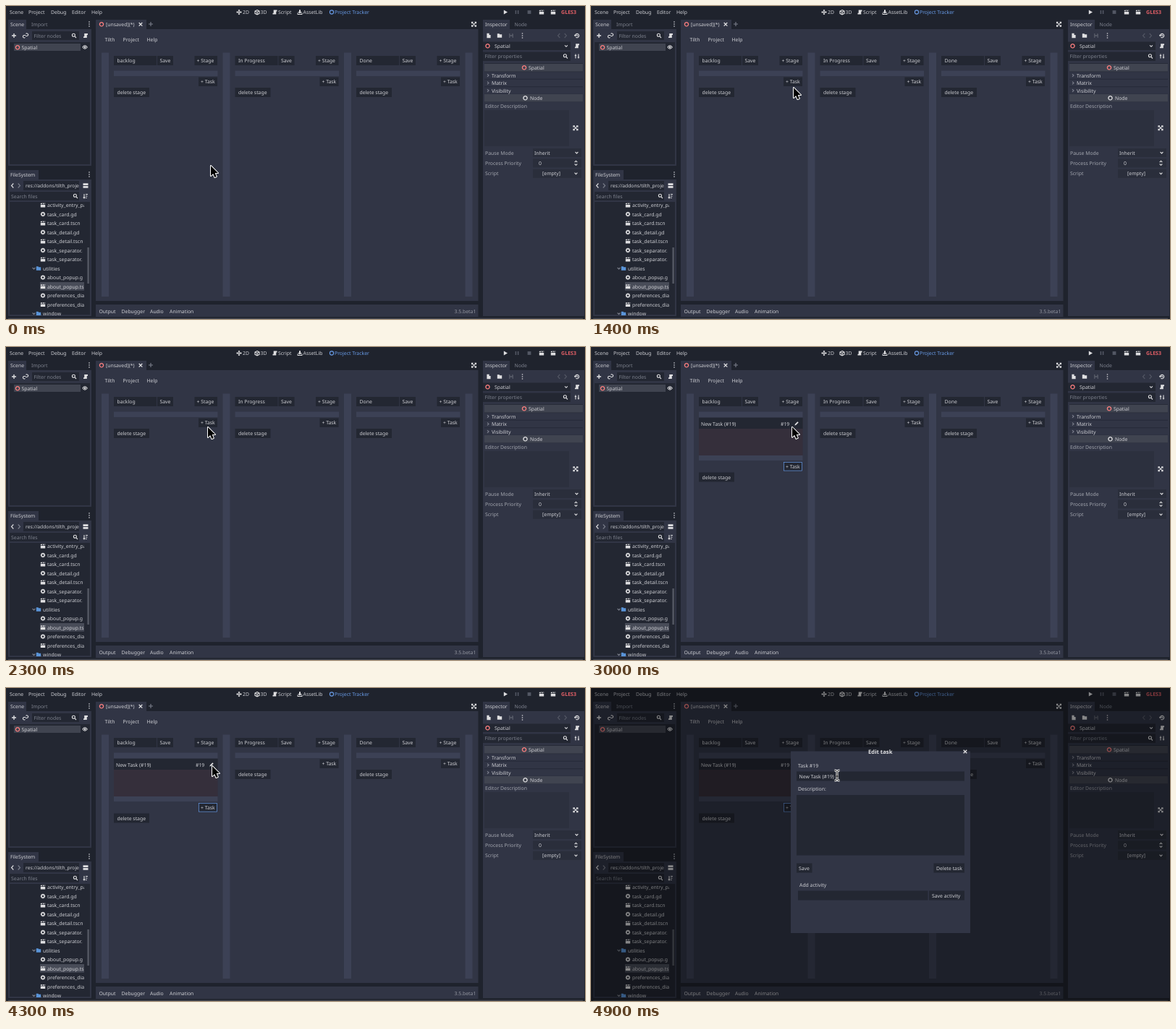
An HTML page with a canvas that plays this animation: 800x433 px, repeating every 5 s.

```html
<!DOCTYPE html>
<html lang="en">
<head>
<meta charset="utf-8">
<title>Project board</title>
<style>
  html, body { margin: 0; width: 100%; height: 100%; overflow: hidden; background: #1f232d; }
  canvas { display: block; width: 800px; height: 433px; }
</style>
</head>
<body>
<canvas width="800" height="433"></canvas>
<script>
const ctx = document.querySelector('canvas').getContext('2d');
const BASE = '#1f232d', PANEL = '#313545', DARK = '#232732', WELL = '#272b38',
      BAR = '#3c4155', ROW = '#404450', INK = '#cdced3', WHITE = '#e0e0e2',
      DIM = '#7d818d', FAINT = '#535764', RED = '#fc7f7f', BLUE = '#699ce8';
const LOOP = 5000, STEP = 100, CARD_AT = 2500, DIALOG_AT = 4400, PITCH = 167.5;

// Small icon outlines, centred on 0,0
const ICONS = {
  plus: 'M-3 0H3M0-3V3',
  cross: 'M-2.3-2.3L2.3 2.3M2.3-2.3L-2.3 2.3',
  down: 'M-1.9-1L0 1L1.9-1',
  right: 'M-1-1.9L1 0L-1 1.9',
  back: 'M1.3-3L-1.5 0L1.3 3',
  next: 'M-1.3-3L1.5 0L-1.3 3',
  search: 'M1.4-.8A2 2 0 1 1-2.6-.8A2 2 0 1 1 1.4-.8M.9.8L3 3',
  link: 'M-.5 2.5A1.8 1.8 0 1 1-2-.5H0M.5-2.5A1.8 1.8 0 1 1 2 .5H0',
  expand: 'M-3-1V-3H-1M1-3H3V-1M3 1V3H1M-1 3H-3V1M-3-3L3 3M3-3L-3 3',
  eye: 'M-3.2 0Q0-4.4 3.2 0Q0 4.4-3.2 0M.7 0A.7.7 0 1 1-.7 0A.7.7 0 1 1 .7 0',
  ring: 'M2.6 0A2.6 2.6 0 1 1-2.6 0A2.6 2.6 0 1 1 2.6 0',
  gear: 'M2 0A2 2 0 1 1-2 0A2 2 0 1 1 2 0M-3.2 0H-2M2 0H3.2M0-3.2V-2M0 2V3.2M-2.3-2.3L-1.5-1.5M1.5 1.5L2.3 2.3M2.3-2.3L1.5-1.5M-1.5 1.5L-2.3 2.3',
  sort: 'M-2-3V3M-3.3 1.7L-2 3L-.7 1.7M0-2.5H3M0 0H2.4M0 2.5H1.6',
  tools: 'M-2-3V3M-3.2-1H-.8M2-3V3M.8 1.5H3.2',
  history: 'M-2.6-.5A2.7 2.7 0 1 1-1.5 2.3M-3.6-1L-2.6.6L-1.2-1M0-1.4V.3H1.5',
  spin: 'M-1.8-1.2L0-3L1.8-1.2M-1.8 1.2L0 3L1.8 1.2',
  move: 'M-3 0H3M0-3V3M-2-1L-3 0L-2 1M2-1L3 0L2 1M-1-2L0-3L1-2M-1 2L0 3L1 2',
  cube: 'M0-3L3-1.5V1.8L0 3.3L-3 1.8V-1.5ZM-3-1.5L0 0L3-1.5M0 0V3.3',
  play: 'M-2.2-3L3 0L-2.2 3Z',
  pause: 'M-2.4-2.6H-.8V2.6H-2.4ZM.8-2.6H2.4V2.6H.8Z',
  stop: 'M-2.4-2.4H2.4V2.4H-2.4Z',
  clap: 'M-3.2-.4H3.2V3H-3.2ZM-3.2-2.6L-1.4-3L-.6-1.2H-3.2ZM-.4-3H1.2L2-1.2H.4ZM2.2-3H3.2V-1.2H3Z',
  folder: 'M-3.2-2.7H-.5L.3-1.7H3.2V2.7H-3.2Z',
  script: 'M-1.8-3H3V-1H1.8V3H-3V1.3H-1.8Z',
  file: 'M-2.6-3.2H.6V-1H2.6V3.2H-2.6Z',
  save: 'M-3-3H2L3-2V3H-3ZM-1.5-3V-1H1.2V-3ZM-1.5 3V1H1.5V3Z',
  asset: 'M-1-3.2H1V-.5H3L0 2L-3-.5H-1ZM-3.4 1H-2.4V2.5H2.4V1H3.4V3.4H-3.4Z',
  split: 'M-3.5-3.2H3.5V-.4H-3.5ZM-3.5.4H3.5V3.2H-3.5Z',
  pencil: 'M-2.6 2.6L-2.1.8L1.4-2.7L2.7-1.4L-.8 2.1Z',
};
const SOLID = new Set('play pause stop clap folder script file save asset split pencil'.split(' '));
for (const name in ICONS) ICONS[name] = new Path2D(ICONS[name]);

function rect(x, y, right, bottom, color) {
  ctx.fillStyle = color;
  ctx.fillRect(x, y, right - x, bottom - y);
}

function text(s, x, y, color = INK, font = '6.87px') {
  ctx.font = font + ' "Noto Sans", sans-serif';
  ctx.fillStyle = color;
  ctx.fillText(s, x, y + 2.5);
}

function icon(name, x, y, color = WHITE, width = 1.1) {
  ctx.save();
  ctx.translate(x, y);
  ctx.fillStyle = ctx.strokeStyle = color;
  ctx.lineWidth = width;
  if (SOLID.has(name)) ctx.fill(ICONS[name], 'evenodd');
  else ctx.stroke(ICONS[name]);
  ctx.restore();
}

function dots(x, y) {
  for (const dy of [-3, 0, 3]) rect(x - .7, y + dy - .7, x + .7, y + dy + .7, INK);
}

// Box with a label; the optional ring marks keyboard focus
function button(s, x, y, right, bottom, pad = 4.5, ring) {
  rect(x, y, right, bottom, DARK);
  text(s, x + pad, (y + bottom) / 2);
  if (ring) {
    ctx.strokeStyle = BLUE;
    ctx.lineWidth = .7;
    ctx.strokeRect(x + .4, y + .4, right - x - .8, bottom - y - .8);
  }
}

function dock(title, x, tabRight, y, right, bottom) {
  rect(x, y, tabRight, y + 13.5, PANEL);
  rect(x, y + 13, right, bottom, PANEL);
  text(title, x + 3, y + 6.3);
}

function drawTopBar() {
  [['Scene', 5], ['Project', 31], ['Debug', 62], ['Editor', 91], ['Help', 118]]
    .forEach(([s, x]) => text(s, x, 8.5));
  [['move', 322, '2D', 327], ['cube', 347, '3D', 351.5], ['script', 371.5, 'Script', 376], ['asset', 406, 'AssetLib', 410.5]]
    .forEach(([name, x, s, tx]) => { icon(name, x, 8.5); text(s, tx, 8.5); });
  icon('ring', 450, 8.5, BLUE);
  text('Project Tracker', 454, 8.5, BLUE);
  icon('play', 690, 8.5);
  icon('pause', 706, 8.5, FAINT);
  icon('stop', 723, 8.5, FAINT);
  icon('clap', 740, 8.5);
  icon('clap', 756, 8.5);
  text('GLES3', 767, 8.5, '#e05f66', 'bold 7.1px');
}

function drawSceneDock() {
  dock('Scene', 3, 28, 19, 118, 221);
  text('Import', 35, 25.3, DIM);
  dots(115, 25);
  icon('plus', 11, 41, WHITE, 1.4);
  icon('link', 27, 41);
  rect(36, 35, 101, 47, DARK);
  text('Filter nodes', 38.5, 41, DIM);
  icon('search', 94, 41);
  icon('script', 110, 41);
  rect(5, 50, 116, 219, DARK);
  rect(11, 52, 103, 62, ROW);
  icon('ring', 16, 57.3, RED, 1.3);
  text('Spatial', 21.5, 57.3);
  icon('eye', 109, 57);
}

function drawFileDock() {
  dock('FileSystem', 3, 45, 227, 118, 429);
  dots(115, 233);
  icon('back', 9, 248.5);
  icon('next', 18, 248.5, DIM);
  rect(24, 242, 101, 255, DARK);
  text('res://addons/tilth_proje', 27, 248.5, INK, '6.7px');
  icon('split', 110, 248.5);
  rect(5, 257, 101, 269, DARK);
  text('Search files', 7, 263.3, DIM);
  icon('search', 96, 263);
  icon('sort', 110, 263);
  rect(5, 271, 116, 427, DARK);
  ctx.save();
  ctx.beginPath();
  ctx.rect(5, 271, 103, 157);
  ctx.clip();
  rect(47, 382, 108, 393.5, '#484c58');
  const files = ['activity_entry_panel', 'task_card.gd', 'task_card.tscn', 'task_detail.gd', 'task_detail.tscn',
    'task_separator.', 'task_separator.', '/utilities', 'about_popup.g', 'about_popup.ts',
    'preferences_dia', 'preferences_dia', '/window'];
  files.forEach((name, i) => {
    const y = 275.5 + i * 12.5;
    if (name[0] === '/') {
      icon('down', 38.5, y, DIM);
      icon('folder', 45, y, '#5a94d8');
      text(name.slice(1), 51, y);
    } else {
      const scene = i < 7 ? i % 2 === 0 : i % 2 === 1;
      icon(scene ? 'clap' : 'gear', 51, y, WHITE, 1.4);
      text(name, 57, y);
    }
  });
  ctx.restore();
  rect(112.3, 334, 115, 384, '#50545f');
}

function drawStage(name, i, hasCard) {
  const x = i * PITCH, drop = hasCard ? 60.5 : 0;
  button(name, x + 149, 69, x + 208, 82);
  button('Save', x + 209, 69, x + 231, 82, 3.5);
  button('+ Stage', x + 260.5, 69, x + 292, 82, 3);
  rect(x + 149, 89.5, x + 292.5, 97, BAR);
  if (hasCard) {
    rect(x + 149, 98, x + 292.5, 150, '#352f3b');
    rect(x + 149, 98, x + 292.5, 113, DARK);
    text('New Task (#19)', x + 152, 106);
    text('#19', x + 262, 106);
    icon('pencil', x + 284, 106);
    rect(x + 149, 150, x + 292.5, 157, BAR);
  }
  button('+ Task', x + 266, 98.5 + drop, x + 292, 111 + drop, 3, hasCard);
  button('delete stage', x + 149, 113 + drop, x + 198, 126 + drop);
}

function drawBoard(hasCard) {
  rect(124, 19, 194, 33, PANEL);
  rect(124, 32, 652.5, 408, PANEL);
  icon('ring', 132, 25.3, RED, 1.3);
  text('[unsaved](*)', 138, 25.3);
  icon('cross', 186, 25.3, WHITE, 1.3);
  icon('plus', 200, 25, DIM);
  icon('expand', 646.5, 25.3);
  text('Tilth', 136.5, 46.5);
  text('Project', 161.5, 46.5);
  text('Help', 194.5, 46.5);
  for (let i = 0; i < 4; i++) rect(132 + i * PITCH, 64.5, 142 + i * PITCH, 402, BAR);
  ['backlog', 'In Progress', 'Done'].forEach((name, i) => drawStage(name, i, hasCard && i === 0));
  rect(124, 413, 652.5, 430, PANEL);
  [['Output', 128.5], ['Debugger', 159.5], ['Audio', 199], ['Animation', 226]]
    .forEach(([s, x]) => text(s, x, 422));
  text('3.5.beta1', 619.5, 422, '#9396a0');
}

function drawInspector() {
  dock('Inspector', 659, 696, 19, 799, 429);
  text('Node', 702.5, 25.3, DIM);
  icon('file', 667, 41);
  icon('folder', 682, 41);
  icon('save', 698, 41, FAINT);
  dots(713.5, 41);
  icon('back', 764, 41, FAINT);
  icon('next', 773, 41, FAINT);
  icon('history', 789, 41);
  rect(659, 49.5, 780, 61, DARK);
  icon('ring', 665.5, 55.3, RED, 1.3);
  text('Spatial', 675, 55.3);
  icon('down', 774, 55.3);
  icon('script', 789, 55.3);
  rect(659, 63.5, 780, 76, DARK);
  text('Filter properties', 661.5, 69.8, DIM);
  icon('search', 773, 69.5);
  icon('tools', 789, 69.5);
  rect(661, 79, 797, 427, WELL);
  rect(661, 80, 797, 90.5, ROW);
  icon('ring', 716, 85.3, RED, 1.3);
  text('Spatial', 722, 85.3);
  ['Transform', 'Matrix', 'Visibility'].forEach((s, i) => {
    const y = 96 + i * 10.5;
    rect(661, y - 4.7, 797, y + 4.7, PANEL);
    icon('right', 666, y, DIM);
    text(s, 671, y);
  });
  rect(661, 122, 797, 132.5, ROW);
  icon('ring', 717.5, 127.3, WHITE, 1.3);
  text('Node', 724, 127.3);
  rect(661, 133, 797, 427, PANEL);
  text('Editor Description', 662, 138.3, '#a3a6af');
  rect(661, 144, 778, 194, '#2c303e');
  icon('expand', 787, 168.7);
  text('Pause Mode', 662, 203, '#a3a6af');
  text('Process Priority', 662, 217.3, '#a3a6af');
  text('Script', 662, 231.7, '#a3a6af');
  for (let i = 0; i < 3; i++) rect(728, 197 + i * 14.4, 795, 209 + i * 14.4, '#2a2e3b');
  text('Inherit', 730, 203);
  icon('down', 788.5, 203);
  text('0', 736, 217.3);
  icon('spin', 787.5, 217.3);
  text('[empty]', 741, 231.7);
  icon('down', 787.5, 231.7);
}

function drawDialog() {
  rect(0, 0, 800, 433, 'rgba(0,0,0,.4)');
  rect(276, 87.5, 524, 339, PANEL);
  text('Edit task', 383, 88, WHITE, 'bold 7.7px');
  icon('cross', 517, 88, WHITE, 1.3);
  text('Task #19', 286, 107.5);
  button('New Task (#19)', 284, 115.5, 516, 128.5, 3.5);
  text('Description:', 286, 139.5);
  rect(284, 148, 516, 231.5, DARK);
  button('Save', 284, 242.5, 305.5, 255.5, 3);
  button('Delete task', 473.5, 242.5, 516, 255.5, 3.5);
  text('Add activity', 288, 272.5);
  rect(286, 280.5, 465.5, 293.5, DARK);
  button('Save activity', 467, 280.5, 516, 293.5, 4);
}

// Pointer stops: time, x, y
const PATH = [[0, 283, 221], [600, 284, 185], [800, 284, 185], [1400, 280, 113], [2300, 279, 111],
  [2800, 279, 111], [3700, 271, 110], [4300, 285, 108], [4400, 285, 108], [4900, 340, 121]];

function pointerAt(t) {
  const i = PATH.findIndex(stop => stop[0] > t);
  if (i < 0) return PATH[PATH.length - 1].slice(1);
  const [t0, x0, y0] = PATH[i - 1], [t1, x1, y1] = PATH[i];
  const u = (t - t0) / (t1 - t0), k = u * u * (3 - 2 * u);
  return [x0 + (x1 - x0) * k, y0 + (y1 - y0) * k];
}

const ARROW = new Path2D('M0 0V14L3.2 11L5.4 16L7.8 15L5.7 10.1H10Z');
const BEAM = new Path2D('M-3.5-7Q-.5-7 0-5.5Q.5-7 3.5-7M0-5.5V5.5M-3.5 7Q-.5 7 0 5.5Q.5 7 3.5 7M-1.8 1H1.8');

function drawPointer(t) {
  const [x, y] = pointerAt(t), overField = t >= DIALOG_AT && y > 115.5;
  ctx.save();
  ctx.translate(x, y);
  ctx.lineJoin = 'round';
  ctx.strokeStyle = '#fff';
  ctx.fillStyle = '#000';
  ctx.lineWidth = overField ? 3 : 2;
  ctx.stroke(overField ? BEAM : ARROW);
  if (overField) {
    ctx.strokeStyle = '#000';
    ctx.lineWidth = 1;
    ctx.stroke(BEAM);
  } else ctx.fill(ARROW);
  ctx.restore();
}

function draw(now) {
  const t = Math.floor(now % LOOP / STEP) * STEP;
  ctx.textRendering = 'geometricPrecision';
  rect(0, 0, 800, 433, BASE);
  drawTopBar();
  drawSceneDock();
  drawFileDock();
  drawBoard(t >= CARD_AT);
  drawInspector();
  rect(3, 431.7, 797, 433, '#43464f');
  if (t >= DIALOG_AT) drawDialog();
  drawPointer(t);
}

const start = performance.now();
(function frame() {
  draw(performance.now() - start);
  requestAnimationFrame(frame);
})();
</script>
</body>
</html>
```
